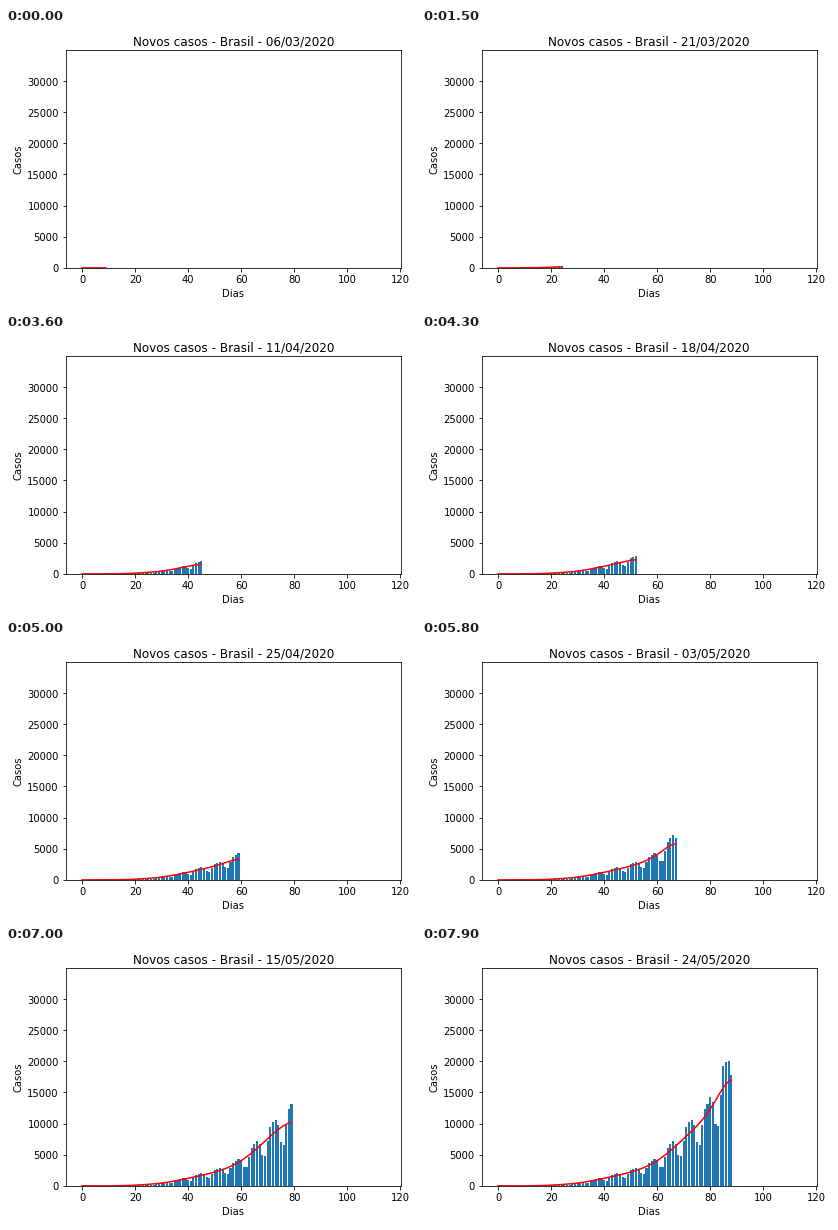
A matplotlib script for the animation above (8000 ms loop, 410 by 278 pixels).

```python
import numpy as np
import matplotlib.pyplot as plt
from matplotlib.animation import FuncAnimation
from matplotlib.transforms import ScaledTranslation

WIDTH, HEIGHT, DPI = 410, 278, 72
FRAMES, INTERVAL = 80, 100
FIRST_DAYS = 10
TOTAL_DAYS = 115
MAX_CASES = 34918
SIGMA = 4
START = np.datetime64("2020-03-06")

# Level of the epidemic on a few days; growth between them is exponential
KEY_DAYS = [0, 9, 23, 30, 37, 44, 58, 65, 72, 79, 85, 90]
KEY_LEVELS = [0.3, 5, 190, 390, 980, 1580, 3320, 5600, 8500, 11000, 16500, 16800]


def daily_cases(days):
    """Exponential growth with a weekly reporting cycle."""
    level = np.exp(np.interp(days, KEY_DAYS, np.log(KEY_LEVELS)))
    week = 2 * np.pi / 7
    cycle = 1 + 0.28 * np.cos(week * (days - 2.2)) + 0.08 * np.cos(2 * week * (days - 0.4))
    return level * cycle


def smooth(values, sigma=SIGMA):
    """Gaussian filter with mirrored ends."""
    radius = 4 * sigma
    kernel = np.exp(-0.5 * (np.arange(-radius, radius + 1) / sigma) ** 2)
    padded = np.pad(values, radius, mode="symmetric")
    return np.convolve(padded, kernel / kernel.sum(), mode="valid")


def title_for(frame):
    year, month, day = str(START + frame).split("-")
    return f"Novos casos - Brasil - {day}/{month}/{year}"


plt.rcParams["font.family"] = "DejaVu Sans"
plt.rcParams["toolbar"] = "None"

fig = plt.figure(figsize=(WIDTH / DPI, HEIGHT / DPI), dpi=DPI, facecolor="white")
ax = fig.add_axes([59.8 / WIDTH, 38.15 / HEIGHT, 334.8 / WIDTH, 217.44 / HEIGHT])

days = np.arange(FIRST_DAYS + FRAMES - 1)
cases = daily_cases(days)
bars = ax.bar(days, cases, color="C0")
line, = ax.plot([], [], color="red")
title = ax.set_title("", pad=5.2)

# Room for the whole series, with the usual 5 % side margins
margin = 0.05 * (TOTAL_DAYS - 0.2)
ax.set_xlim(-0.4 - margin, TOTAL_DAYS - 0.6 + margin)
ax.set_ylim(0, MAX_CASES)
ax.set_xlabel("Dias")
ax.set_ylabel("Casos")

# Tick labels sit slightly below their ticks
nudge = ScaledTranslation(0, -0.6 / DPI, fig.dpi_scale_trans)
for label in ax.get_yticklabels():
    label.set_transform(label.get_transform() + nudge)


def update(frame):
    count = FIRST_DAYS + frame
    for i, bar in enumerate(bars):
        bar.set_visible(i < count)
    line.set_data(days[:count], smooth(cases[:count]))
    title.set_text(title_for(frame))
    return [*bars, line, title]


anim = FuncAnimation(fig, update, frames=FRAMES, interval=INTERVAL,
                     repeat=True, repeat_delay=0, blit=False)
plt.show()
```
